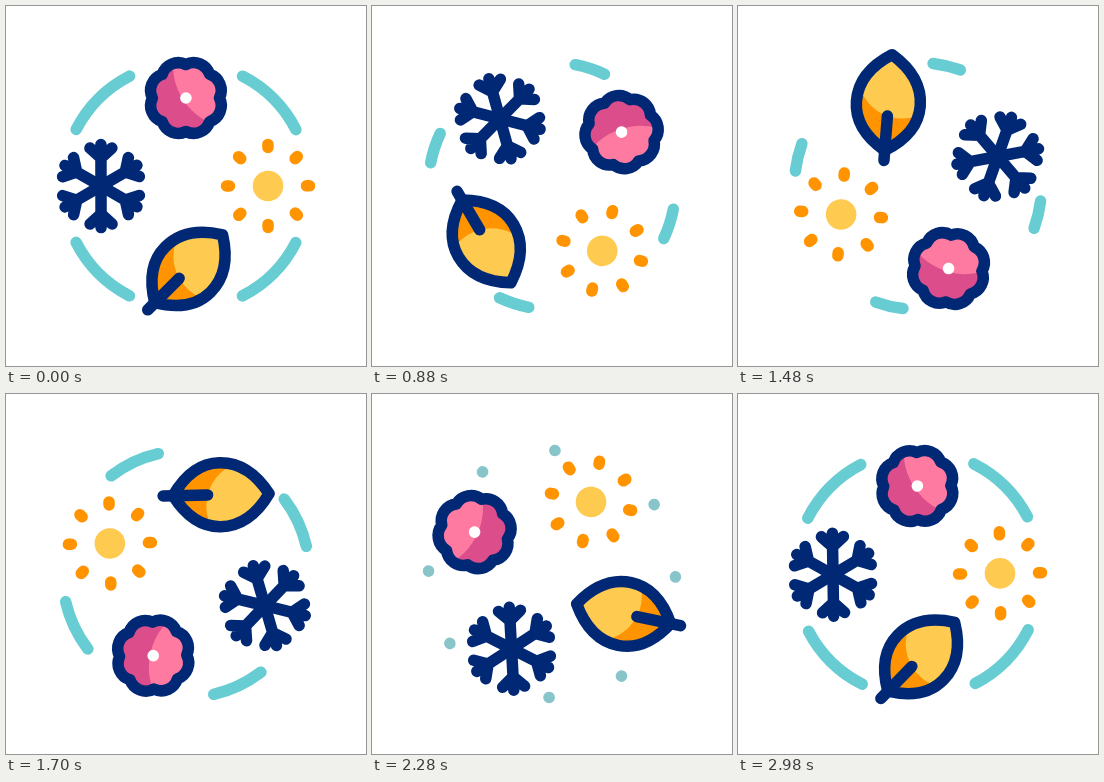
Animation, 360 px wide and 360 px high, one loop 3000 ms. Source, as an HTML page:

```html
<!DOCTYPE html>
<html lang="en">
<head>
<meta charset="utf-8">
<title>Four seasons</title>
<style>
  html, body { margin: 0; width: 100%; height: 100%; overflow: hidden; background: #fff; }
  svg { display: block; width: 100vw; height: 100vh; }
  .line, .ray, .arc { fill: none; stroke-width: 11.5; stroke-linecap: round; stroke-linejoin: round; }
  .line { stroke: #002874; }
  .ray { stroke: #ff9400; }
</style>
</head>
<body>
<svg viewBox="0 0 360 360">
  <defs>
    <path id="leafShape" d="M-46 0C-34-20-18-32 1-32S37-21 50 0C37 21 20 32 1 32S-34 20-46 0Z"/>
    <clipPath id="leafClip"><use href="#leafShape"/></clipPath>
    <path id="bloomShape"/>
    <clipPath id="bloomClip"><use href="#bloomShape"/></clipPath>
  </defs>
  <path class="arc"/>
  <path class="arc"/>
  <g class="item" data-x="180" data-y="92">
    <use href="#bloomShape" fill="#dc4d8b"/>
    <circle cx="51" cy="-33" r="64" fill="#ff7aa0" clip-path="url(#bloomClip)"/>
    <use href="#bloomShape" class="line"/>
    <circle r="5.8" fill="#fff"/>
  </g>
  <g class="item" data-x="262" data-y="180" id="sun">
    <circle r="15.3" fill="#ffca50"/>
  </g>
  <g class="item" data-x="180.2" data-y="265.3">
    <g transform="translate(1 -1.1) rotate(-45)">
      <use href="#leafShape" fill="#ff9400"/>
      <g clip-path="url(#leafClip)"><circle cx="32" cy="12" r="45" fill="#ffca50"/></g>
      <use href="#leafShape" class="line"/>
      <path class="line" d="M-56 0H-11.5"/>
    </g>
  </g>
  <g class="item" data-x="95" data-y="180" id="snow"></g>
</svg>
<script>
const LOOP = 3000;
const NS = 'http://www.w3.org/2000/svg';
const TEAL = '#68cdd2', PALE = '#88c5ca', GREY = '#7287a8';

// Turn of the whole ring: time in ms, angle in degrees
const turn = [[0, 0], [200, -4.9], [560, 12.7], [880, 52.1], [1260, 117.3],
  [1700, 201.7], [2280, 298.3], [2710, 344], [3000, 360]];
const rise = i => (turn[i + 1][1] - turn[i][1]) / (turn[i + 1][0] - turn[i][0]);
const slope = turn.map((p, i) => {
  if (i === 0) return -0.052;
  if (i === turn.length - 1) return 0.02;
  const before = p[0] - turn[i - 1][0], after = turn[i + 1][0] - p[0];
  return (rise(i - 1) * after + rise(i) * before) / (before + after);
});

function angleAt(t) {
  let i = 0;
  while (i < turn.length - 2 && t >= turn[i + 1][0]) i++;
  const [t0, a] = turn[i], [t1, b] = turn[i + 1];
  const h = t1 - t0, s = (t - t0) / h, r = 1 - s;
  return a * r * r * (1 + 2 * s) + b * s * s * (3 - 2 * s)
    + h * s * r * (slope[i] * r - slope[i + 1] * s);
}

function ease(t, from, to) {
  const s = Math.min(1, Math.max(0, (t - from) / (to - from)));
  return s * s * (3 - 2 * s);
}

function polar(r, deg) {
  const a = deg * Math.PI / 180;
  return (r * Math.cos(a)).toFixed(2) + ' ' + (r * Math.sin(a)).toFixed(2);
}

function add(parent, cls, d, deg) {
  const p = document.createElementNS(NS, 'path');
  p.setAttribute('class', cls);
  p.setAttribute('d', d);
  p.setAttribute('transform', `rotate(${deg})`);
  parent.append(p);
}

let bloom = 'M' + polar(33.5, 0);
for (let i = 1; i <= 8; i++) bloom += 'A16.9 16.9 0 0 1 ' + polar(33.5, i * 45);
document.getElementById('bloomShape').setAttribute('d', bloom + 'Z');

const sun = document.getElementById('sun'), snow = document.getElementById('snow');
for (let i = 0; i < 8; i++) add(sun, 'ray', 'M0-38.5V-41.5', i * 45);
for (let i = 0; i < 6; i++) add(snow, 'line', 'M0 0V-41.5M-11-38L0-28L11-38', i * 60);

const items = [...document.querySelectorAll('.item')];
const arcs = document.querySelectorAll('.arc');

function drawArcs(el, angle, from, to, tint) {
  let d = '';
  if (to - from > 0.0001) {
    const a = angle + 27.3 + 35.6 * from;
    const b = Math.max(a + 0.1, angle + 27.3 + 35.6 * to);
    for (let k = 0; k < 360; k += 90) {
      d += `M${polar(123.5, a + k)}A123.5 123.5 0 0 1 ${polar(123.5, b + k)}`;
    }
  }
  el.setAttribute('d', d);
  el.setAttribute('transform', 'translate(180 180)');
  el.setAttribute('stroke', to - from < 0.05 ? tint : TEAL);
}

function draw(t) {
  const angle = angleAt(t);
  for (const el of items) {
    const { x, y } = el.dataset;
    el.setAttribute('transform',
      `rotate(${angle} 180 180) translate(${x} ${y}) rotate(${angle})`);
  }
  // First and last strokes share one path; the middle one has its own
  if (t < 2000) drawArcs(arcs[0], angle, ease(t, 400, 1250), 1, PALE);
  else drawArcs(arcs[0], angle, 0, ease(t, 2260, 3000), PALE);
  drawArcs(arcs[1], angle, ease(t, 1560, 2290), ease(t, 1170, 1930), t < 1600 ? GREY : PALE);
}

const start = performance.now();
function tick() {
  draw((performance.now() - start) % LOOP);
  requestAnimationFrame(tick);
}
tick();
</script>
</body>
</html>
```
